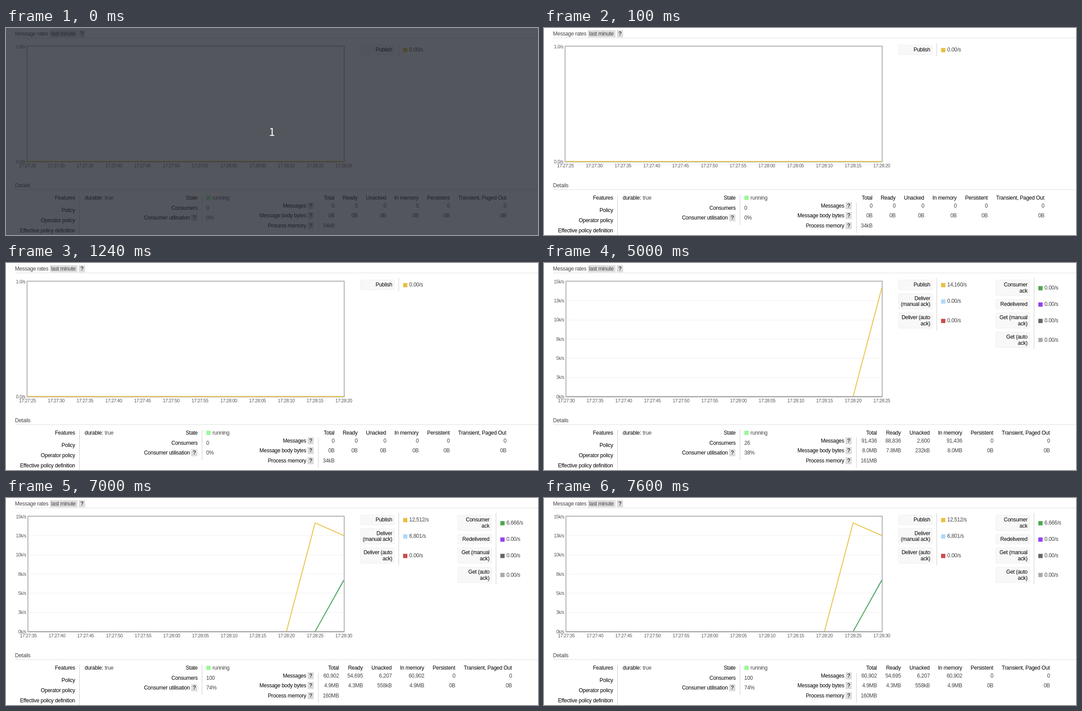
Recreate the animation shown at these times as an HTML page. Size 1198 px wide and 468 px high, loop 8000 ms.

```html
<!DOCTYPE html>
<html lang="en">
<head>
<meta charset="utf-8">
<title>Message rates</title>
<style>
html, body { margin: 0; width: 100%; height: 100%; overflow: hidden; background: #fff; }
svg { display: block; width: 1198px; height: 468px; }
text {
  font-family: "Liberation Sans", Arial, sans-serif; font-size: 12px;
  letter-spacing: -0.27px; fill: #444; white-space: pre;
}
.th { fill: #000; }
.axis { font-size: 10.3px; letter-spacing: -0.3px; fill: #545454; }
.count { font-family: "Noto Sans CJK JP", "Noto Sans CJK SC", "Noto Sans CJK", sans-serif; font-size: 25px; letter-spacing: 0; fill: #fff; }
</style>
</head>
<body>
<svg id="stage" viewBox="0 0 1198 468" xmlns="http://www.w3.org/2000/svg"></svg>
<script>
const LOOP = 8000;
const COLORS = {
  publish: '#e8c040', deliver: '#afd8f8', auto: '#cb4b4b', ack: '#4da74d',
  redeliver: '#9440ed', getManual: '#666', getAuto: '#aaa'
};
const RIGHT = 760.7, BASE = 301.8;

// Each state: what the page shows after one refresh
const STATES = [
  {
    first: 25, left: 48.3, live: false, series: [],
    rates: ['0.00/s'], consumers: '0', use: '0%',
    cols: [739.5, 791.5, 856, 929, 999, 1126.5],
    rows: [['0', '0', '0', '0', '0', '0'], ['0B', '0B', '0B', '0B', '0B', '0B'], ['34kB']]
  },
  {
    first: 30, left: 50.3, live: true,
    series: [[COLORS.publish, [0, 14160]]],
    rates: ['14,160/s', '0.00/s', '0.00/s', '0.00/s', '0.00/s', '0.00/s', '0.00/s'],
    consumers: '26', use: '38%',
    cols: [749.5, 803.5, 868.5, 941.5, 1011.5, 1139],
    rows: [['91,436', '88,836', '2,600', '91,436', '0', '0'],
           ['8.0MB', '7.8MB', '232kB', '8.0MB', '0B', '0B'], ['161MB']]
  },
  {
    first: 35, left: 50.3, live: true,
    series: [[COLORS.publish, [0, 14160, 12512]], [COLORS.deliver, [0, 6801]], [COLORS.ack, [0, 6666]]],
    rates: ['12,512/s', '6,801/s', '0.00/s', '6,666/s', '0.00/s', '0.00/s', '0.00/s'],
    consumers: '100', use: '74%',
    cols: [749.5, 803.5, 868.5, 941.5, 1011.5, 1139],
    rows: [['60,902', '54,695', '6,207', '60,902', '0', '0'],
           ['4.9MB', '4.3MB', '558kB', '4.9MB', '0B', '0B'], ['160MB']]
  }
];

// Legend entries: column x, box top, box height, label lines, value centre, colour
const LEGEND = [
  [799, 38.5, 22, ['Publish'], 49, COLORS.publish],
  [799, 69, 35, ['Deliver', '(manual ack)'], 86.3, COLORS.deliver],
  [799, 112.5, 35, ['Deliver (auto', 'ack)'], 130, COLORS.auto],
  [1018, 38.5, 35, ['Consumer', 'ack'], 56, COLORS.ack],
  [1018, 82.5, 21.5, ['Redelivered'], 93, COLORS.redeliver],
  [1018, 112.5, 35, ['Get (manual', 'ack)'], 130, COLORS.getManual],
  [1018, 156.5, 35, ['Get (auto', 'ack)'], 173.6, COLORS.getAuto]
];

const rect = (x, y, w, h, fill, more = '') =>
  `<rect x="${x}" y="${y}" width="${w}" height="${h}" fill="${fill}" ${more}/>`;
const vline = (x, y1, y2) => rect(x, y1, 1, y2 - y1, '#ccc');
const swatch = (x, y, fill) => rect(x + 0.2, y + 0.2, 9.6, 9.6, fill);
// y is the middle of the capitals
const text = (x, y, s, anchor = 'start', cls = '') =>
  `<text x="${x}" y="${y + (cls === 'axis' ? 3.5 : 4)}" text-anchor="${anchor}" class="${cls}">${s}</text>`;
const label = (x, y, s) => text(x, y, s, 'end', 'th');
const help = (x, y) => rect(x, y - 8, 14, 16, '#ddd') + text(x + 7, y, '?', 'middle', 'th');
const heading = (y, s) => text(20.3, y, s) + rect(21, y + 9, 1177, 1, '#ddd');

function clock(sec) {
  const two = n => String(n).padStart(2, '0');
  return `17:${two(27 + Math.floor(sec / 60))}:${two(sec % 60)}`;
}

function chart(s) {
  const width = RIGHT - s.left, step = width / 11;
  let out = '';
  const names = s.live ? ['15k/s', '13k/s', '10k/s', '8k/s', '5k/s', '3k/s', '0k/s'] : ['1.0/s', '0.0/s'];
  names.forEach((name, i) => {
    const y = 42 + 260 * i / (names.length - 1);
    if (i && i < names.length - 1) out += rect(s.left, Math.round(y) - 0.5, width, 1, '#eee');
    out += text(s.left - 5, y, name, 'end', 'axis');
  });
  for (let i = 0; i < 12; i++) {
    out += text(s.left + i * step, 311.5, clock(s.first + i * 5), 'middle', 'axis');
  }
  // The border lies just outside the plot
  out += rect(s.left - 0.9, 41.1, width + 1.8, 261.6, 'none', 'stroke="#aaa" stroke-width="1.9"');
  for (const [color, vals] of s.series) {
    const pts = vals.map((v, i) =>
      `${RIGHT - (vals.length - 1 - i) * step},${BASE - v / 15000 * 260}`).join(' ');
    out += `<polyline points="${pts}" fill="none" stroke="${color}" stroke-width="1.9" stroke-linejoin="round"/>`;
  }
  return out + rect(s.left, BASE - 1, width, 1.9, s.live ? COLORS.getAuto : COLORS.publish);
}

function legend(s) {
  let out = vline(884, 34, s.live ? 152 : 64);
  if (s.live) out += vline(1103, 34, 195);
  s.rates.forEach((rate, i) => {
    const [x, y, h, lines, mid, color] = LEGEND[i];
    out += rect(x - 0.5, y, 76, h, '#f8f8f8', 'rx="2" stroke="#eee"');
    lines.forEach((line, n) => {
      out += label(x + 70.7, y + h / 2 - 0.2 + (n - (lines.length - 1) / 2) * 13.4, line);
    });
    out += swatch(x + 95, Math.round(mid + 0.6) - 5, color) + text(x + 109, mid, rate);
  });
  return out;
}

function details(s) {
  let out = heading(356, 'Details');
  out += label(155.5, 383.5, 'Features') + label(155.5, 411.5, 'Policy') +
    label(155.5, 434.5, 'Operator policy') + label(155.5, 457.5, 'Effective policy definition') +
    vline(165, 377, 468) + text(177.3, 383.5, 'durable:', 'start', 'th') + text(222.3, 383.5, 'true');
  out += label(431.5, 383.5, 'State') + label(431.5, 406.5, 'Consumers') +
    label(414, 429, 'Consumer utilisation') + help(417, 429) + vline(441, 377, 445) +
    swatch(451, 379, '#98f898') + text(465, 383.5, 'running') +
    text(451, 406.5, s.consumers) + text(451, 429, s.use);
  out += vline(703, 395, 463);
  ['Total', 'Ready', 'Unacked', 'In memory', 'Persistent', 'Transient, Paged Out'].forEach((name, i) => {
    out += label(s.cols[i], 383.5, name);
  });
  ['Messages', 'Message body bytes', 'Process memory'].forEach((name, r) => {
    const y = 401.5 + r * 22.8;
    out += label(676, y, name) + help(679, Math.round(y));
    s.rows[r].forEach((v, i) => { out += text(s.cols[i] + 0.3, y, v, 'end'); });
  });
  return out;
}

function page(s) {
  return rect(0, 0, 1198, 468, '#fff') + heading(13, 'Message rates') +
    rect(99, 5, 62, 16, '#ddd') + text(101.6, 13, 'last minute') + help(164, 13) +
    chart(s) + legend(s) + details(s);
}

const countdown = rect(0, 0, 1198, 468, '#23272f', 'fill-opacity="0.78"') +
  '<text x="599" y="243.5" text-anchor="middle" class="count">1</text>';

const stage = document.getElementById('stage');
let shown = '';

function draw(t) {
  const state = t < 2000 ? 0 : t < 7000 ? 1 : 2;
  const dim = t < 100;
  const key = state + ':' + dim;
  if (key === shown) return;
  shown = key;
  stage.innerHTML = page(STATES[state]) + (dim ? countdown : '');
}

const start = performance.now();
function tick() {
  draw((performance.now() - start) % LOOP);
  requestAnimationFrame(tick);
}
tick();
</script>
</body>
</html>
```
